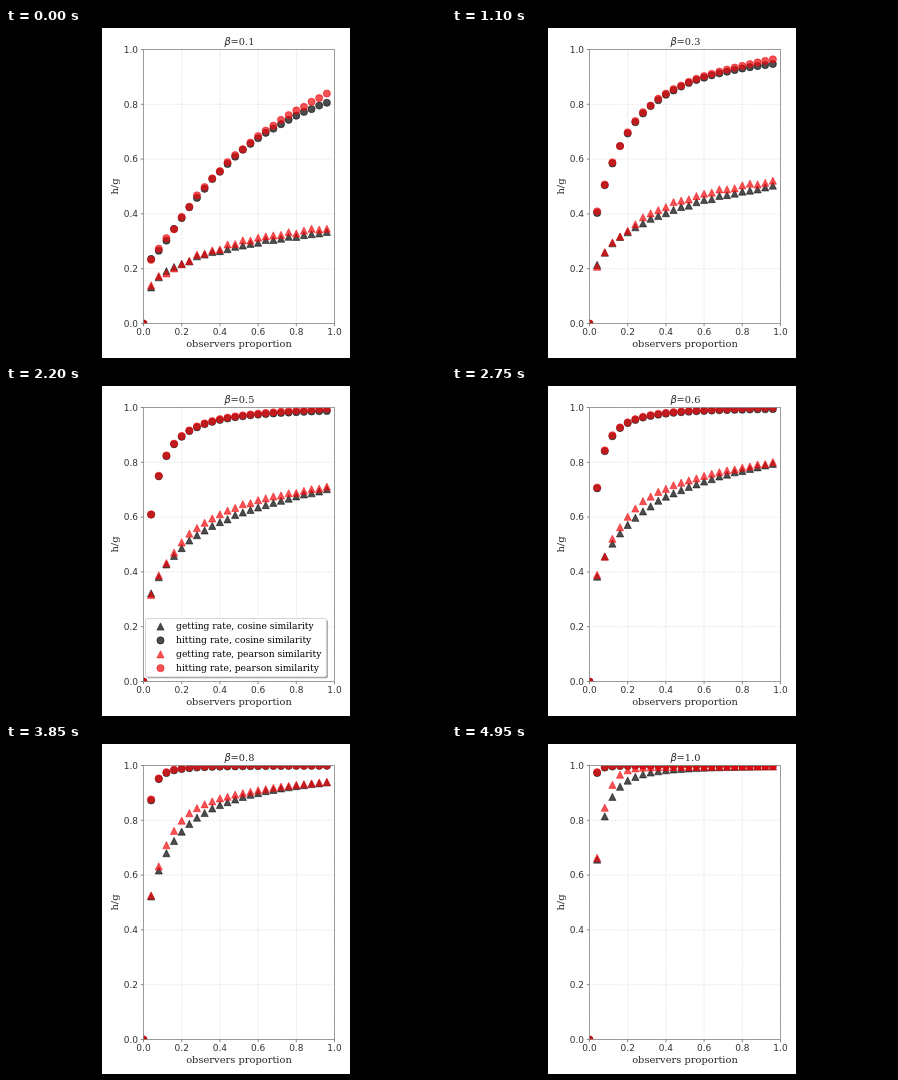
Recreate the animation shown at these times as an HTML page with a canvas. Size 440 px wide and 330 px high, loop 5500 ms.

```html
<!DOCTYPE html>
<html lang="en">
<head>
<meta charset="utf-8">
<title>Rates by observers proportion</title>
<style>
html, body { margin: 0; width: 100%; height: 100%; overflow: hidden; background: #000; }
canvas { display: block; width: 440px; height: 330px; }
</style>
</head>
<body>
<canvas id="stage" width="440" height="330"></canvas>
<script>
const ctx = document.getElementById('stage').getContext('2d');
const STEP = 550, STEPS = 10, POINTS = 25;
const LEFT = 137.5, RIGHT = 328.5, TOP = 21.5, BOTTOM = 295.5;
const SERIF = '"DejaVu Serif", serif', SANS = '"DejaVu Sans", sans-serif';
const BLACK = 'rgba(0,0,0,0.7)', RED = 'rgba(238,8,12,0.7)';

const px = x => LEFT + (RIGHT - LEFT) * x;
const py = y => BOTTOM - (BOTTOM - TOP) * y;
const logistic = z => 1 / (1 + Math.exp(-z));

// Rates are logistic in t, the octaves of x above the first proportion.
function hitRate(b, t) {
  const start = -1.58 + 4 * b + 1.15 * b ** 6;
  return logistic(start + (1.4 * b - 0.1) * t + (0.13 - 0.15 * b) * t * t);
}

function getRate(b, t) {
  const start = -2.15 + 2.8 * b;
  return logistic(start + (0.255 + 0.5 * b ** 8) * t + 0.08 * b * b * t * t);
}

// How far the pearson rates lie above the cosine rates.
const hitGap = (b, x) => 0.003 + 0.05 * (1 - b) ** 3 * x ** 4;
const getGap = (b, t) => 0.045 * Math.sqrt(b) * Math.exp(-(((t - 4.6 + 2.8 * b) / 1.3) ** 2));

function noise(seed) {
  const n = Math.sin(seed * 12.9898 + 4.1) * 43758.5453;
  return n - Math.floor(n) - 0.5;
}

function buildSeries(step) {
  const b = (step + 1) / 10;
  const series = [[], [], [], []];
  for (let i = 0; i < POINTS; i++) {
    const x = i / POINTS, t = Math.log2(i);
    const get = i && getRate(b, t), hit = i && hitRate(b, t);
    const values = i ? [get, hit, get + getGap(b, t), hit + hitGap(b, x)] : [0, 0, 0, 0];
    values.forEach((y, s) => {
      const spread = i ? (1 - y) * (s < 2 ? 0.012 : 0.018) : 0;
      series[s].push([x, Math.min(1, y + spread * noise(step * 100 + s * POINTS + i))]);
    });
  }
  return series;
}

const frames = Array.from({ length: STEPS }, (_, k) => buildSeries(k));

function marker(kind, x, y) {
  ctx.beginPath();
  if (kind % 2) {
    ctx.arc(x, y, 3.6, 0, Math.PI * 2);
  } else {
    ctx.moveTo(x, y - 3.6);
    ctx.lineTo(x + 3.6, y + 3.6);
    ctx.lineTo(x - 3.6, y + 3.6);
    ctx.closePath();
  }
  ctx.fillStyle = ctx.strokeStyle = kind < 2 ? BLACK : RED;
  ctx.lineWidth = 0.7;
  ctx.fill();
  ctx.stroke();
}

function text(str, x, y, font, align = 'center', color = '#262626') {
  ctx.font = font;
  ctx.textAlign = align;
  ctx.fillStyle = color;
  ctx.fillText(str, x, y);
}

function line(x1, y1, x2, y2) {
  ctx.beginPath();
  ctx.moveTo(x1, y1);
  ctx.lineTo(x2, y2);
  ctx.stroke();
}

function drawAxes() {
  ctx.fillStyle = '#000';
  ctx.fillRect(0, 0, 440, 330);
  ctx.fillStyle = '#fff';
  ctx.fillRect(96, 0, 248, 330);
  for (let k = 0; k <= 5; k++) {
    const v = k / 5, x = px(v), y = py(v), label = v.toFixed(1);
    ctx.lineWidth = 0.7;
    ctx.strokeStyle = '#dcdcdc';
    ctx.setLineDash([1.5, 1]);
    line(x, TOP, x, BOTTOM);
    line(LEFT, y, RIGHT, y);
    ctx.setLineDash([]);
    ctx.strokeStyle = '#555';
    line(x, BOTTOM, x, BOTTOM + 2.7);
    line(LEFT, y, LEFT - 2.7, y);
    text(label, x, 306.5, '9px ' + SANS, 'center', '#333');
    text(label, 132, y + 3.2, '9px ' + SANS, 'right', '#333');
  }
  text('observers proportion', 233, 319, '9.9px ' + SERIF);
  ctx.save();
  ctx.translate(111.5, 158.5);
  ctx.rotate(-Math.PI / 2);
  text('h/g', 0, 0, '10px ' + SERIF);
  ctx.restore();
}

function drawTitle(step) {
  text('β', 218.4, 17, 'italic 9.8px ' + SANS, 'left');
  text('=' + ((step + 1) / 10).toFixed(1), 224.6, 17, '9.8px ' + SERIF, 'left');
}

function box(x, y, w, h, fill) {
  ctx.beginPath();
  ctx.roundRect(x, y, w, h, 2);
  ctx.fillStyle = fill;
  ctx.fill();
}

function drawLegend() {
  box(140.8, 233.8, 181, 58.4, '#999');
  box(139.5, 232.5, 181, 58.4, '#fff');
  ctx.strokeStyle = '#ccc';
  ctx.lineWidth = 0.8;
  ctx.stroke();
  ['getting rate, cosine', 'hitting rate, cosine', 'getting rate, pearson', 'hitting rate, pearson']
    .forEach((name, k) => {
      const y = 240.5 + k * 13.9;
      marker(k, 154.5, y);
      text(name + ' similarity', 170, y + 2.6, '9.2px ' + SERIF, 'left', '#000');
    });
}

function draw(now) {
  const step = Math.floor(now / STEP) % STEPS;
  drawAxes();
  drawTitle(step);
  ctx.save();
  ctx.beginPath();
  ctx.rect(LEFT, TOP, RIGHT - LEFT, BOTTOM - TOP);
  ctx.clip();
  frames[step].forEach((points, s) => points.forEach(([x, y]) => marker(s, px(x), py(y))));
  ctx.restore();
  ctx.strokeStyle = '#888';
  ctx.lineWidth = 0.8;
  ctx.strokeRect(LEFT, TOP, RIGHT - LEFT, BOTTOM - TOP);
  if (step === 4) drawLegend();
}

function tick() {
  draw(performance.now());
  requestAnimationFrame(tick);
}
tick();
</script>
</body>
</html>
```
